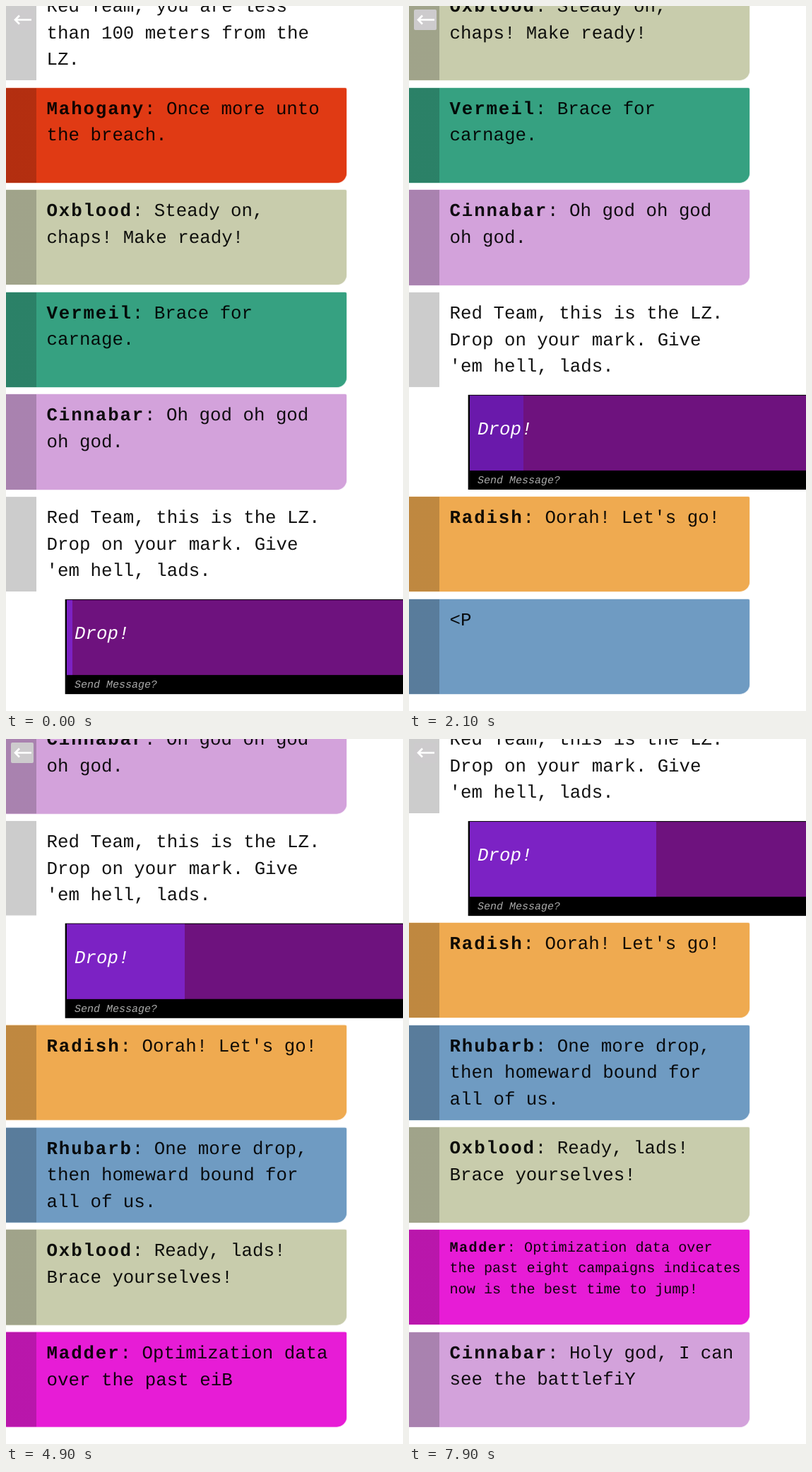
An HTML page that plays this animation: 562x997 px, repeating every 8 s.

```html
<!DOCTYPE html>
<html lang="en">
<head>
<meta charset="utf-8">
<title>Drop chat</title>
<style>
  html, body { margin: 0; width: 100%; height: 100%; overflow: hidden; background: #fff; }
  #stage {
    position: relative; width: 562px; height: 997px; overflow: hidden;
    font-family: "Liberation Mono", "Courier New", monospace;
    text-rendering: geometricPrecision;
  }
  #log { position: absolute; inset: 0; }
  .row { position: absolute; left: 0; width: 481.5px; height: 134.3px; }
  .message {
    border-radius: 0 2px 14px 0;
    background: linear-gradient(90deg, rgba(0, 0, 0, .2) 43px, transparent 43px) var(--tint);
    box-shadow: 0 0 1.5px var(--tint);
  }
  .message p {
    position: absolute; left: 57.5px; top: 12px; width: 413px; margin: 0;
    line-height: 1.456; color: rgba(0, 0, 0, .93);
  }
  .message b { letter-spacing: .0715em; }
  .reply {
    left: 84px; width: 478px; background: #000; color: #fff;
    font-style: italic; box-shadow: -1px 0 #aaa;
  }
  .reply .track { position: absolute; left: 2px; right: 0; top: 1px; height: 106.8px; background: #6e127e; }
  .reply .bar { height: 100%; }
  .reply span { position: absolute; left: 13px; line-height: 1; white-space: pre; }
  .reply .order { top: 37.5px; font-size: 25.8px; }
  .reply .hint { top: 114px; font-size: 15px; color: #aaa; }
  #back { position: absolute; left: 7px; top: 5px; width: 32px; height: 29px; border-radius: 2px; background: #cdcbcd; }
</style>
</head>
<body>
<div id="stage">
  <div id="log"></div>
  <svg id="back" viewBox="0 0 32 29" fill="none" stroke="#fff" stroke-width="2.6">
    <path d="M29 14.5H6M12 8.5L6 14.5L12 20.5"/>
  </svg>
</div>
<script>
  const LOOP = 8000, TICK = 100, CHARS_PER_TICK = 6;
  const PITCH = 144.6, LAST_TOP = 838.7;
  const FULL_SIZE = 25.8, MAX_HEIGHT = 113;

  const TINT = {
    white: '#fff', red: '#e03a14', olive: '#c8ccac', green: '#36a181',
    lilac: '#d3a2db', orange: '#efaa50', blue: '#6f9bc2', pink: '#e71cd6'
  };

  // start: tick at which a message arrives; noise: the scrambled letter after the typed part
  const rows = [
    { tint: 'white', text: 'Red Team, you are less than 100 meters from the LZ.' },
    { tint: 'red', text: '<b>Mahogany</b>: Once more unto the breach.' },
    { tint: 'olive', text: '<b>Oxblood</b>: Steady on, chaps! Make ready!' },
    { tint: 'green', text: '<b>Vermeil</b>: Brace for carnage.' },
    { tint: 'lilac', text: '<b>Cinnabar</b>: Oh god oh god oh god.' },
    { tint: 'white', text: "Red Team, this is the LZ. Drop on your mark. Give 'em hell, lads." },
    { reply: true },
    { tint: 'orange', start: 1, noise: 'QTMXJR', text: "<b>Radish</b>: Oorah! Let's go!" },
    { tint: 'blue', start: 21, noise: 'PDWLHZCNUGK', bar: '#6a19ab',
      text: '<b>Rhubarb</b>: One more drop, then homeward bound for all of us.' },
    { tint: 'olive', start: 31, noise: 'VSEYAFOI', bar: '#530c8c',
      text: '<b>Oxblood</b>: Ready, lads! Brace yourselves!' },
    { tint: 'pink', start: 41, noise: 'GKXRTNWMBQJZHUDLC',
      text: '<b>Madder</b>: Optimization data over the past eight campaigns indicates now is the best time to jump!' },
    { tint: 'lilac', start: 71, noise: 'HMZRKUDWY',
      text: '<b>Cinnabar</b>: Holy god, I can see the battlefield!' }
  ];

  const log = document.getElementById('log');

  function add(parent, tag, className, text = '') {
    const el = document.createElement(tag);
    el.className = className;
    el.textContent = text;
    return parent.appendChild(el);
  }

  // Complete bold tags take effect; half-typed ones stay visible.
  function setMarkup(p, raw) {
    p.textContent = '';
    let bold = false;
    for (const part of raw.split(/(<b>|<\/b>)/)) {
      if (part === '<b>') bold = true;
      else if (part === '</b>') bold = false;
      else if (bold) add(p, 'b', '', part);
      else p.append(part);
    }
  }

  function fitText(p) {
    let size = FULL_SIZE;
    p.style.fontSize = size + 'px';
    while (p.offsetHeight > MAX_HEIGHT && size > 12) {
      size -= .05;
      p.style.fontSize = size + 'px';
    }
  }

  function showText(row, raw) {
    if (row.shown === raw) return;
    row.shown = raw;
    setMarkup(row.p, raw);
    fitText(row.p);
  }

  function typed(row, tick) {
    if (row.start === undefined) return row.text;
    const step = tick - row.start;
    const count = step * CHARS_PER_TICK + 1;
    if (count >= row.text.length) return row.text;
    return row.text.slice(0, count) + row.noise[step % row.noise.length];
  }

  let bar;
  rows.forEach((row, i) => {
    row.el = add(log, 'div', 'row ' + (row.reply ? 'reply' : 'message'));
    row.el.style.top = i * PITCH + 'px';
    if (row.reply) {
      bar = add(add(row.el, 'div', 'track'), 'div', 'bar');
      add(row.el, 'span', 'order', 'Drop!');
      add(row.el, 'span', 'hint', 'Send Message?');
    } else {
      row.el.style.setProperty('--tint', TINT[row.tint]);
      row.p = add(row.el, 'p', '');
    }
  });

  function draw(tick) {
    let last = 0;
    rows.forEach((row, i) => {
      const visible = tick >= (row.start ?? 0);
      row.el.style.visibility = visible ? 'visible' : 'hidden';
      if (!visible) return;
      last = i;
      if (row.p) showText(row, typed(row, tick));
    });
    log.style.transform = `translateY(${LAST_TOP - last * PITCH}px)`;
    bar.style.width = 8 + tick * 3.24 + 'px';
    bar.style.background = rows[last].bar ?? '#7c22c4';
  }

  let drawn = -1;
  function frame(now) {
    // A small lead keeps a tick from landing late on slightly early timestamps.
    const tick = Math.floor(((now + 10) % LOOP) / TICK);
    if (tick !== drawn) draw(drawn = tick);
    requestAnimationFrame(frame);
  }
  draw(0);
  requestAnimationFrame(frame);
</script>
</body>
</html>
```
